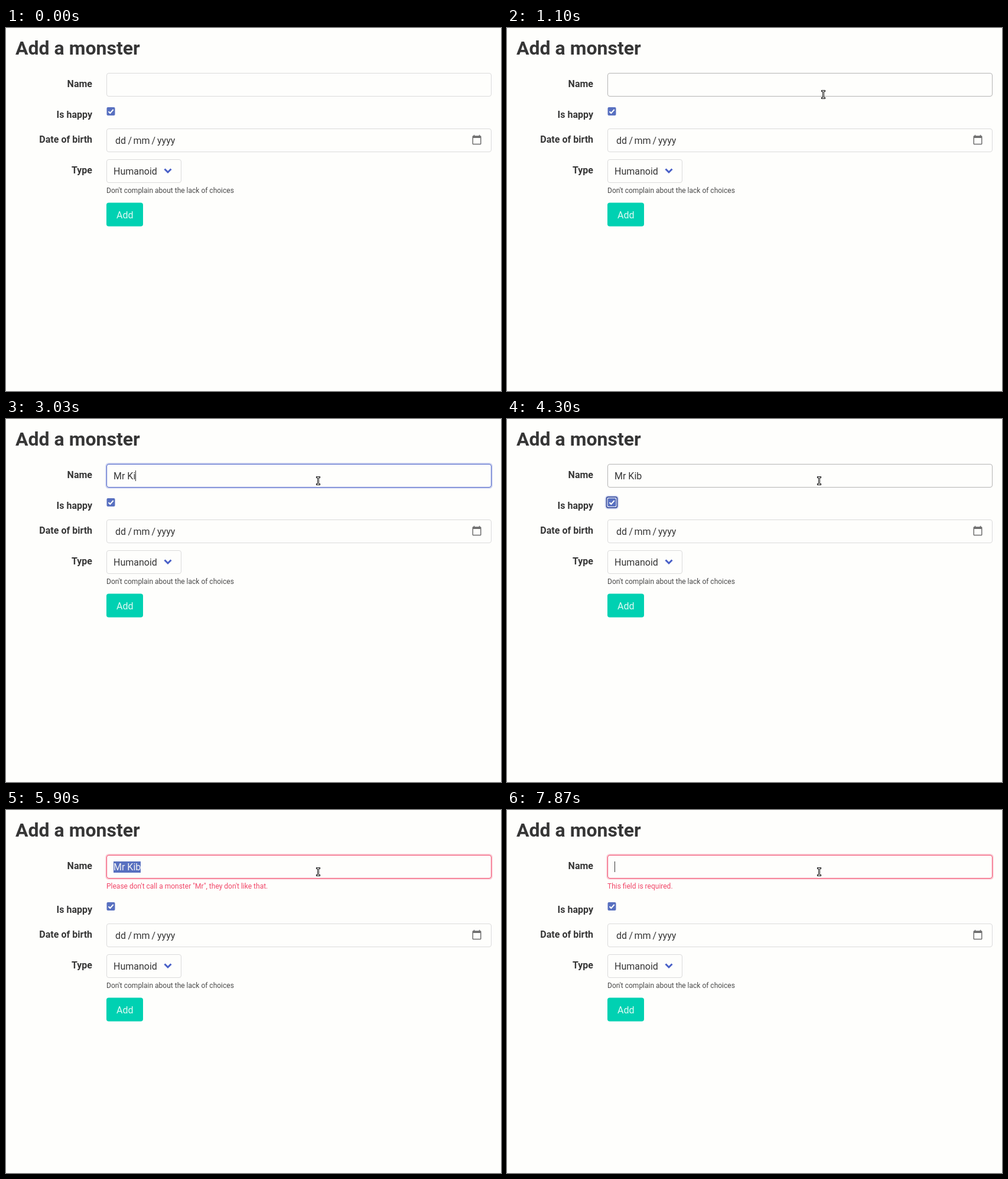
Recreate the animation shown at these times as an HTML page with a canvas. Size 838 px wide and 614 px high, loop 8 s.

```html
<!DOCTYPE html>
<html lang="en">
<head>
<meta charset="utf-8">
<title>Add a monster</title>
<style>
html, body { margin: 0; width: 100%; height: 100%; overflow: hidden; background: #fefefc; }
canvas { display: block; }
</style>
</head>
<body>
<canvas id="stage" width="838" height="614"></canvas>
<script>
const ctx = document.getElementById('stage').getContext('2d');
const LOOP = 8000;
const INK = '#363636', PAPER = '#fefefc';
const LINE = '#dbdbdb', HOVER = '#b5b5b5', BLUE = '#485fc7', RED = '#f14668';
const ACCENT = '#5870c0';

// Text of the name field: [start time, value]
const typing = [
  [0, ''], [2400, 'M'], [2530, 'Mr'], [2670, 'Mr '], [2870, 'Mr K'], [3030, 'Mr Ki'],
  [3230, 'Mr Kinb'], [3630, 'Mr Kin'], [3800, 'Mr Ki'], [3900, 'Mr Kib'], [6330, '']
];

// Pointer path: [time, x, y]
const path = [
  [730, 828, 292], [770, 775, 256], [800, 720, 225], [830, 670, 199], [870, 622, 180],
  [900, 588, 165], [970, 560, 142], [1070, 538, 116], [1170, 528, 104]
];

const calendarIcon = new Path2D('M20 3h-1V1h-2v2H7V1H5v2H4c-1.1 0-2 .9-2 2v16c0 1.1.9 2 2 2' +
  'h16c1.1 0 2-.9 2-2V5c0-1.1-.9-2-2-2zm0 18H4V8h16v13z');

const between = (t, a, b) => t >= a && t < b;
const progress = (t, a, b) => Math.min(1, Math.max(0, (t - a) / (b - a)));
const ease = p => p * p * (3 - 2 * p);

function pointer(t) {
  if (t < path[0][0]) return null;
  for (let i = 1; i < path.length; i++) {
    const [t0, x0, y0] = path[i - 1], [t1, x1, y1] = path[i];
    if (t < t1) {
      const p = (t - t0) / (t1 - t0);
      return { x: x0 + (x1 - x0) * p, y: y0 + (y1 - y0) * p };
    }
  }
  const [, x, y] = path[path.length - 1];
  return { x, y };
}

function text(s, x, y, { size = 16, weight = 400, color = INK, align = 'left' } = {}) {
  ctx.font = `${weight} ${size}px Roboto, sans-serif`;
  ctx.textAlign = align;
  ctx.fillStyle = color;
  ctx.fillText(s, x, y);
}

const label = (s, y) => text(s, 146, y, { weight: 700, align: 'right' });

function round(x, y, w, h, r) {
  ctx.beginPath();
  ctx.roundRect(x, y, w, h, r);
}

function box(x, y, w, h, color, glow) {
  if (glow) {
    round(x - 2, y - 2, w + 4, h + 4, 6);
    ctx.fillStyle = glow;
    ctx.fill();
  }
  round(x + .5, y + .5, w - 1, h - 1, 3.5);
  ctx.fillStyle = PAPER;
  ctx.fill();
  ctx.strokeStyle = color;
  ctx.lineWidth = 1;
  ctx.stroke();
}

function line(points, color, width) {
  ctx.beginPath();
  points.forEach(([x, y]) => ctx.lineTo(x, y));
  ctx.strokeStyle = color;
  ctx.lineWidth = width;
  ctx.stroke();
}

function nameField(t, focused, invalid, hover) {
  const color = invalid ? RED : focused ? BLUE : hover ? HOVER : LINE;
  const glow = focused && (invalid ? '#fbd1d9' : '#d1d7f1');
  box(170, 76, 652, 40, color, glow);

  const value = typing.filter(([start]) => t >= start).pop()[1];
  const selected = between(t, 5900, 6330);
  ctx.font = '400 16px Roboto, sans-serif';
  const width = ctx.measureText(value).width;
  if (selected) {
    ctx.fillStyle = ACCENT;
    ctx.fillRect(182, 87, Math.round(width), 19);
  }
  text(value, 182, 102, { color: selected ? '#f4f4f4' : INK });
  if (focused && !selected) {
    ctx.fillStyle = INK;
    ctx.fillRect(Math.round(182 + width), 87, 1, 18);
  }
}

function checkbox(x, y, focused) {
  if (focused) {
    round(x - 5, y - 5, 24, 24, 6);
    ctx.fillStyle = '#dde2f4';
    ctx.fill();
    round(x - 2, y - 2, 18, 18, 3);
    ctx.fillStyle = PAPER;
    ctx.fill();
    ctx.strokeStyle = '#4458a4';
    ctx.lineWidth = 2;
    ctx.stroke();
  }
  round(x, y, 14, 14, 2);
  ctx.fillStyle = ACCENT;
  ctx.fill();
  line([[x + 3, y + 7.2], [x + 5.8, y + 10], [x + 11.2, y + 4]], PAPER, 2);
}

function calendar(x, y) {
  ctx.save();
  ctx.translate(x, y);
  ctx.scale(.75, .75);
  ctx.fillStyle = '#6e6e6e';
  ctx.fill(calendarIcon);
  ctx.restore();
}

function lowerForm(dateHover, checkFocus) {
  label('Is happy', 152);
  checkbox(170.5, 134, checkFocus);

  label('Date of birth', 194);
  box(170, 170, 652, 40, dateHover ? HOVER : LINE);
  [['dd', 185], ['/', 206.5], ['mm', 215.5], ['/', 246.5], ['yyyy', 256]]
    .forEach(([s, x]) => text(s, x, 196));
  calendar(788, 180);

  label('Type', 246);
  box(170, 222, 127, 40, LINE);
  text('Humanoid', 182, 248);
  line([[268.5, 238.5], [274, 244], [279.5, 238.5]], BLUE, 3);
  text("Don't complain about the lack of choices", 170, 279, { size: 12, color: '#4a4a4a' });

  round(170, 295.5, 62, 40, 4);
  ctx.fillStyle = '#00d1b2';
  ctx.fill();
  text('Add', 187, 322, { color: '#e0faf5' });
}

function arrow(x, y) {
  ctx.beginPath();
  [[0, 0], [0, 16], [3.7, 12.6], [6.3, 19], [9, 17.9], [6.3, 11.6], [11, 11.4]]
    .forEach(([dx, dy]) => ctx.lineTo(x + dx + .5, y + dy + .5));
  ctx.closePath();
  ctx.fillStyle = PAPER;
  ctx.fill();
  ctx.strokeStyle = '#141414';
  ctx.lineWidth = 1.3;
  ctx.stroke();
}

function beam(x, y) {
  const bars = grow => {
    [[-2, -6, 5, 1], [-2, 6, 5, 1], [0, -6, 1, 13]].forEach(([dx, dy, w, h]) =>
      ctx.fillRect(x + dx - grow, y + dy - grow, w + 2 * grow, h + 2 * grow));
  };
  ctx.fillStyle = '#141414';
  bars(1);
  ctx.fillStyle = PAPER;
  bars(0);
}

function draw(t) {
  const cursor = pointer(t);
  const overName = cursor && cursor.y < 116;
  const overDate = cursor && cursor.x < 822 && cursor.y >= 164 && cursor.y < 210;
  const checkFocus = between(t, 4300, 5900) || between(t, 6730, 7870);
  const nameFocus = t >= 1370 && !checkFocus;
  const opened = ease(progress(t, 4330, 4570));

  ctx.fillStyle = PAPER;
  ctx.fillRect(0, 0, 838, 614);
  text('Add a monster', 16, 45, { size: 32, weight: 600 });
  label('Name', 100);
  nameField(t, nameFocus, t >= 4370, overName);

  if (opened > 0) {
    const message = t < 6770
      ? 'Please don\'t call a monster "Mr", they don\'t like that.'
      : 'This field is required.';
    ctx.globalAlpha = opened;
    text(message, 170, 133, { size: 12, color: RED });
    ctx.globalAlpha = 1;
  }

  ctx.save();
  ctx.translate(0, 22 * opened);
  lowerForm(overDate, checkFocus);
  ctx.restore();

  if (cursor) {
    const x = Math.round(cursor.x), y = Math.round(cursor.y);
    overName ? beam(x, y) : arrow(x, y);
  }
}

const start = performance.now();
function tick(now) {
  draw(Math.max(0, now - start) % LOOP);
  requestAnimationFrame(tick);
}
draw(0);
requestAnimationFrame(tick);
</script>
</body>
</html>
```
